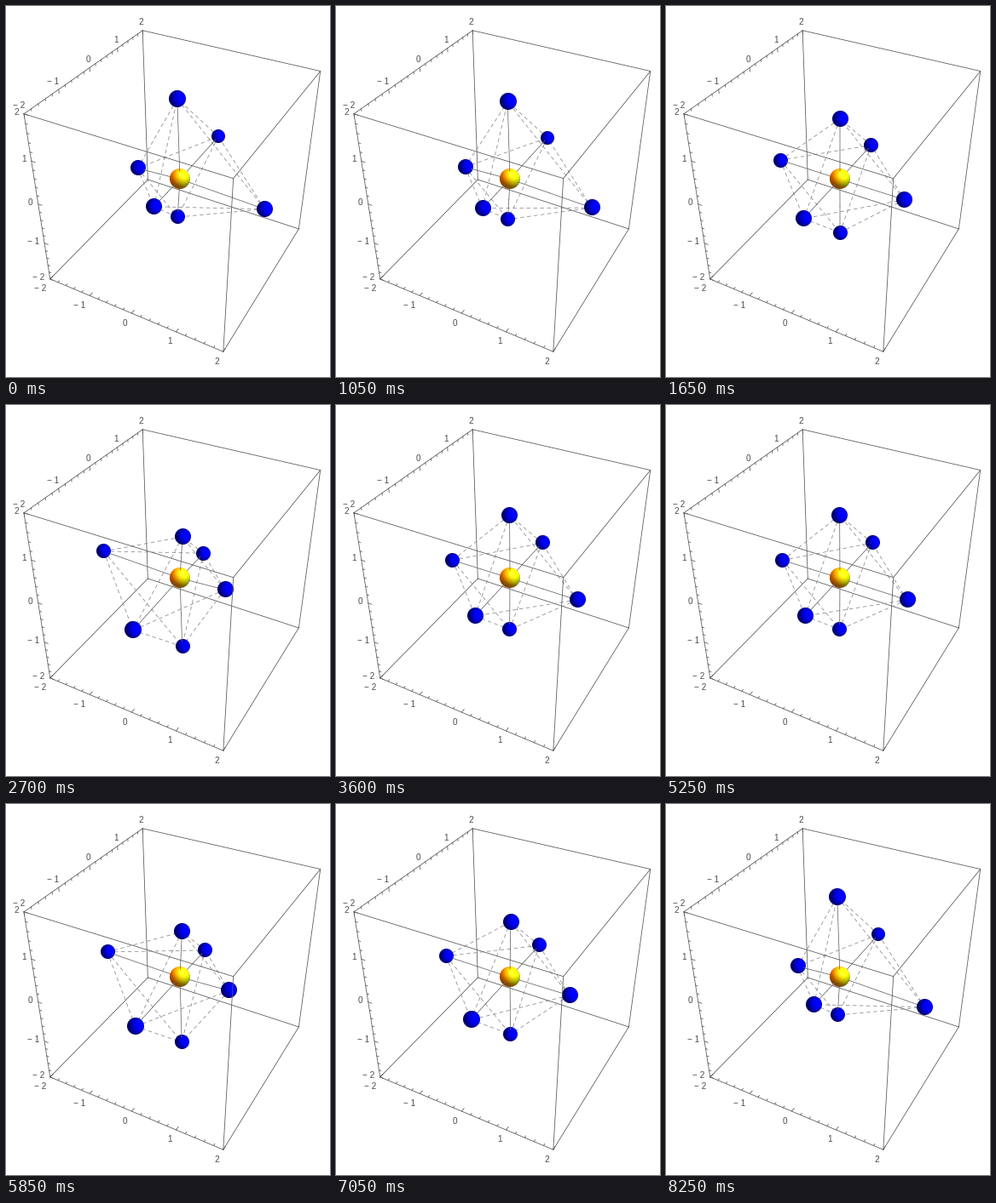
Write a matplotlib script that moves like this. It is 380 px wide and 436 px high and loops after 9 s.

```python
import itertools

import matplotlib.pyplot as plt
import numpy as np
from matplotlib.animation import FuncAnimation

W, H, DPI = 380, 436, 100
FRAMES, INTERVAL = 60, 150
PX = 72 / DPI  # points per pixel

# Perspective camera looking at the middle of the box
EYE = 4 * np.array([1.3, -2.4, 2.0])
MIDDLE = np.array([204.0, 203.5])
FOCAL = 790
VIEW = -EYE / np.linalg.norm(EYE)
RIGHT = np.cross(VIEW, [0, 0, 1])
RIGHT /= np.linalg.norm(RIGHT)
UP = np.cross(RIGHT, VIEW)

# Molecule geometry and motion
BOND = np.sqrt(2)
STRETCH, BEND = 0.447, -0.0375
STEPS, LEAD, HOLD = 25, 0.185, 4
CORE_R, ATOM_R = 0.2, 0.15
AXES = [s * np.eye(3)[i] for i in range(3) for s in (1, -1)]

# Light colour and direction (right, up, towards the viewer)
AMBIENT = np.array([0.5, 0.25, 0.3])
LIGHTS = [
    ((0, 0.18, 0.5), (1, 0, 1)),
    ((0.18, 0.5, 0.18), (1, 1, 1)),
    ((0.5, 0.18, 0), (0, 1, 1)),
    ((0, 0, 0.18), (0, 0, 1)),
]


def depth(p):
    return np.dot(np.asarray(p) - EYE, VIEW)


def project(p):
    p = np.asarray(p, float)
    return MIDDLE + FOCAL / depth(p) * np.array([p @ RIGHT, -(p @ UP)])


def unit(v):
    v = np.asarray(v, float)
    return v / np.linalg.norm(v)


def sphere_image(color, gloss=0.0, n=96):
    """Shaded ball as an RGBA picture."""
    c = (np.arange(n) + 0.5) / n * 2 - 1
    x, y = np.meshgrid(c, -c)
    rad = np.hypot(x, y)
    squeeze = np.maximum(rad, 1)
    x, y = x / squeeze, y / squeeze
    normal = np.dstack([x, y, np.sqrt(np.clip(1 - x**2 - y**2, 0, 1))])
    light = np.ones((n, n, 3)) * AMBIENT
    for tint, where in LIGHTS:
        light += np.clip(normal @ unit(where), 0, 1)[..., None] * np.array(tint)
    rgb = light * np.array(color)
    shine = np.clip(normal @ unit([0.25, 0.4, 1]), 0, 1) ** 12
    rgb = np.clip(rgb + gloss * shine[..., None], 0, 1)
    return np.dstack([rgb, (rad <= 1).astype(float)])


fig = plt.figure(figsize=(W / DPI, H / DPI), dpi=DPI, facecolor="white")
ax = fig.add_axes([0, 0, 1, 1])
ax.axis("off")


def line(a=None, b=None, z=1, color="0.35", width=0.8, **kw):
    xs, ys = ([], []) if a is None else zip(a, b)
    return ax.plot(xs, ys, color=color, lw=width * PX, zorder=z, **kw)[0]


def set_line(artist, a, b):
    artist.set_data(*zip(project(a), project(b)))


def draw_box():
    near = (2, -2, 2)
    corners = list(itertools.product((-2, 2), repeat=3))
    for a, b in itertools.combinations(corners, 2):
        if sum(u != v for u, v in zip(a, b)) == 1:
            line(project(a), project(b), z=30 if near in (a, b) else 1)


def draw_scale(axis, start, inward, offset):
    """Ticks and labels along one box edge."""
    for i in range(-10, 11):
        p = np.array(start, float)
        p[axis] = i / 5
        base = project(p)
        way = unit(project(p + 0.1 * np.array(inward)) - base)
        major = i % 5 == 0
        line(base, base + way * (4.5 if major else 2.5))
        if major:
            ax.text(*(base + offset), str(i // 5).replace("-", "\u2212 "),
                    family="Liberation Sans", size=10 * PX, color="0.3",
                    ha="right", va="center_baseline", zorder=31)


draw_box()
draw_scale(0, (0, -2, -2), (0, 1, 0), (-4.7, 10.5))
draw_scale(1, (-2, 0, 2), (0, 0, -1), (0.8, -10.5))
draw_scale(2, (-2, -2, 0), (1, 0, 0), (-6.2, -3))

PAIRS = [(i, j) for i, j in itertools.combinations(range(6), 2)
         if AXES[i] @ AXES[j] == 0]
DASH = (0, (4.5 / 0.8, 3.5 / 0.8))
edges = [line(z=2, color="0.55", linestyle=DASH) for _ in PAIRS]
far_halves = [line(z=3, color="0.42") for _ in AXES]
near_halves = [line(color="0.42") for _ in AXES]

blue = sphere_image((0, 0, 1))
core = ax.imshow(sphere_image((1, 1, 0), 0.18), aspect="auto")
atoms = [ax.imshow(blue, aspect="auto") for _ in AXES]
ax.set_xlim(0, W)
ax.set_ylim(H, 0)


def place(ball, p, radius):
    x, y = project(p)
    r = FOCAL * radius / depth(p)
    ball.set_extent((x - r, x + r, y + r, y - r))
    ball.set_zorder(20 - depth(p) / 2)


def update(frame):
    # the swing runs forward, then back, resting at both ends
    k = np.clip(min(frame, FRAMES - 1 - frame) - HOLD, 0, STEPS)
    swing = np.cos(2 * np.pi * k / STEPS - LEAD)
    spots = []
    for axis in AXES:
        shift = np.where(axis != 0, STRETCH, BEND)
        spots.append(BOND * axis + swing * shift)

    origin = np.zeros(3)
    place(core, origin, CORE_R)
    for p, atom, far, near in zip(spots, atoms, far_halves, near_halves):
        place(atom, p, ATOM_R)
        way, half = unit(p), p / 2
        # one half ends on a visible surface, the other behind a ball
        if way @ VIEW < 0:
            set_line(near, CORE_R * way, half)
            set_line(far, half, p)
            near.set_zorder(core.get_zorder() + 0.01)
        else:
            set_line(near, half, p - ATOM_R * way)
            set_line(far, origin, half)
            near.set_zorder(atom.get_zorder() + 0.01)
    for edge, (i, j) in zip(edges, PAIRS):
        set_line(edge, spots[i], spots[j])
    ax.set_xlim(0, W)
    ax.set_ylim(H, 0)
    return [core, *atoms, *far_halves, *near_halves, *edges]


anim = FuncAnimation(fig, update, frames=FRAMES, interval=INTERVAL,
                     init_func=lambda: update(0), repeat=True,
                     repeat_delay=0, blit=False)
plt.show()
```
